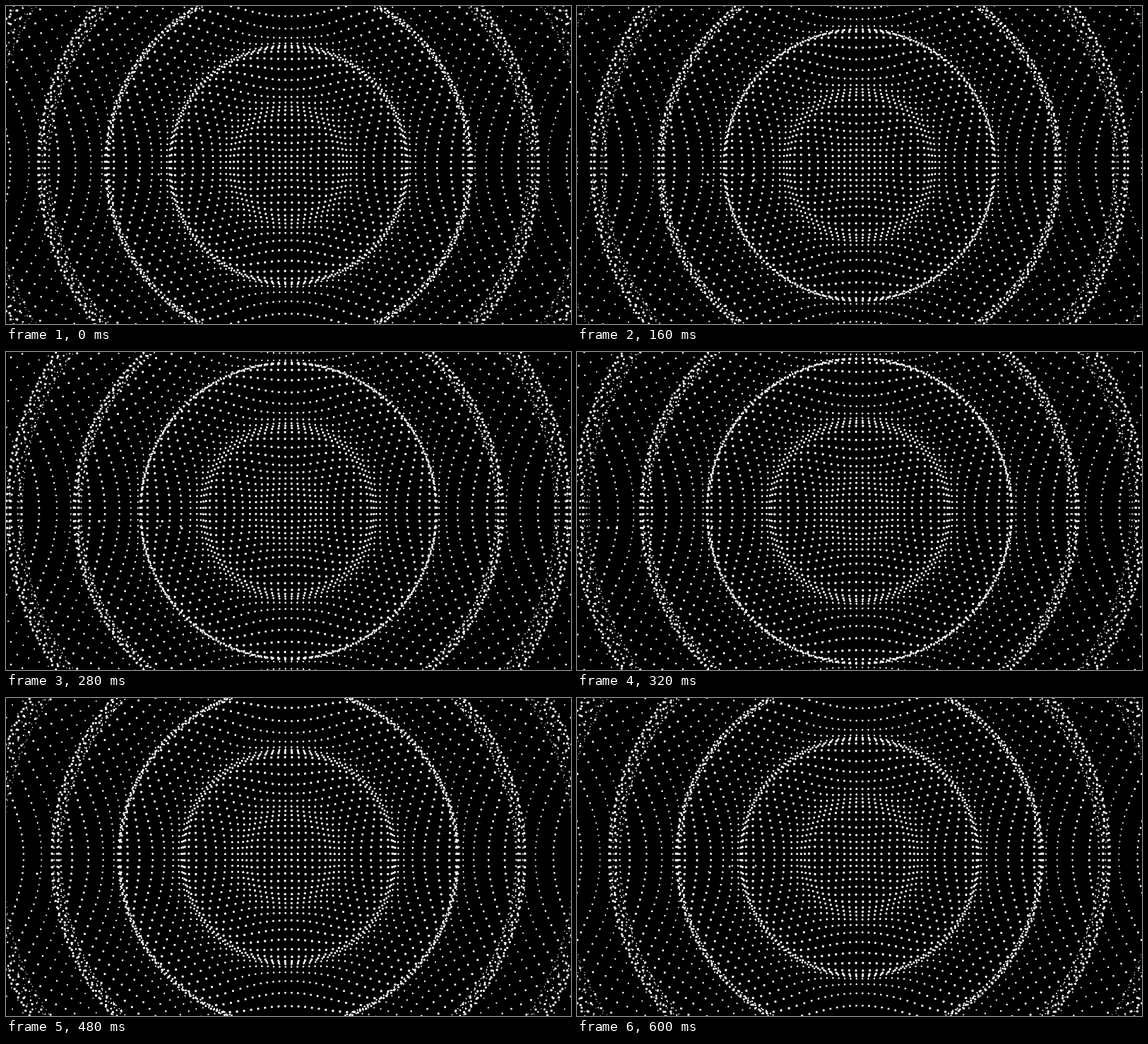
An HTML page without scripts for the animation above (0.64 s loop, 800 by 450 pixels).

```html
<!DOCTYPE html>
<html lang="en">
<head>
<meta charset="utf-8">
<title>Dot ripple</title>
<style>
  @property --step { syntax: "<number>"; inherits: true; initial-value: 0; }
  @property --x { syntax: "<number>"; inherits: false; initial-value: 0; }
  @property --y { syntax: "<number>"; inherits: false; initial-value: 0; }
  @property --dist { syntax: "<number>"; inherits: false; initial-value: 0; }
  @property --wave { syntax: "<number>"; inherits: false; initial-value: 0; }
  @property --w { syntax: "<length>"; inherits: false; initial-value: 0px; }
  @property --h { syntax: "<length>"; inherits: false; initial-value: 0px; }

  html, body { margin: 0; width: 100%; height: 100%; overflow: hidden; background: #000; }

  svg {
    display: block;
    width: 100%;
    height: 100%;
    animation: ripple 640ms steps(16) infinite;
  }

  /* 15 steps make one wave; the 16th repeats the first pose */
  @keyframes ripple {
    from { --step: 0; }
    to { --step: 16; }
  }

  /* Each rect shows only its corners: four mirrored dots, drawn as zero-length round dashes */
  rect {
    --x: calc(4.5 + 9 * (var(--i) + 8 * var(--m)));
    --y: calc(4.5 + 9 * (var(--j) + 9 * var(--n)));
    --dist: hypot(var(--x), var(--y));
    --wave: sin(360deg * (var(--step) / 15 + 1.888 - var(--dist) / 89));
    --w: calc(2px * var(--x) / (1 - 0.077 * var(--wave)));
    --h: calc(2px * var(--y) / (1 - 0.077 * var(--wave)));
    x: calc(var(--w) / -2);
    y: calc(var(--h) / -2);
    width: var(--w);
    height: var(--h);
    fill: none;
    stroke: #fff;
    stroke-width: calc(3.4px + 1px * var(--dist) * (0.0026 * var(--wave) - 0.0022));
    stroke-linecap: round;
    stroke-dasharray: 0px, var(--w), 0px, var(--h);
  }
</style>
</head>
<body>
<svg viewBox="-400 -225 800 450">
  <defs>
    <g id="run">
      <rect style="--i:0"/>
      <rect style="--i:1"/>
      <rect style="--i:2"/>
      <rect style="--i:3"/>
      <rect style="--i:4"/>
      <rect style="--i:5"/>
      <rect style="--i:6"/>
      <rect style="--i:7"/>
    </g>
    <g id="row">
      <use href="#run" style="--m:0"/>
      <use href="#run" style="--m:1"/>
      <use href="#run" style="--m:2"/>
      <use href="#run" style="--m:3"/>
      <use href="#run" style="--m:4"/>
      <use href="#run" style="--m:5"/>
    </g>
    <g id="band">
      <use href="#row" style="--j:0"/>
      <use href="#row" style="--j:1"/>
      <use href="#row" style="--j:2"/>
      <use href="#row" style="--j:3"/>
      <use href="#row" style="--j:4"/>
      <use href="#row" style="--j:5"/>
      <use href="#row" style="--j:6"/>
      <use href="#row" style="--j:7"/>
      <use href="#row" style="--j:8"/>
    </g>
  </defs>
  <use href="#band" style="--n:0"/>
  <use href="#band" style="--n:1"/>
  <use href="#band" style="--n:2"/>
</svg>
</body>
</html>
```
